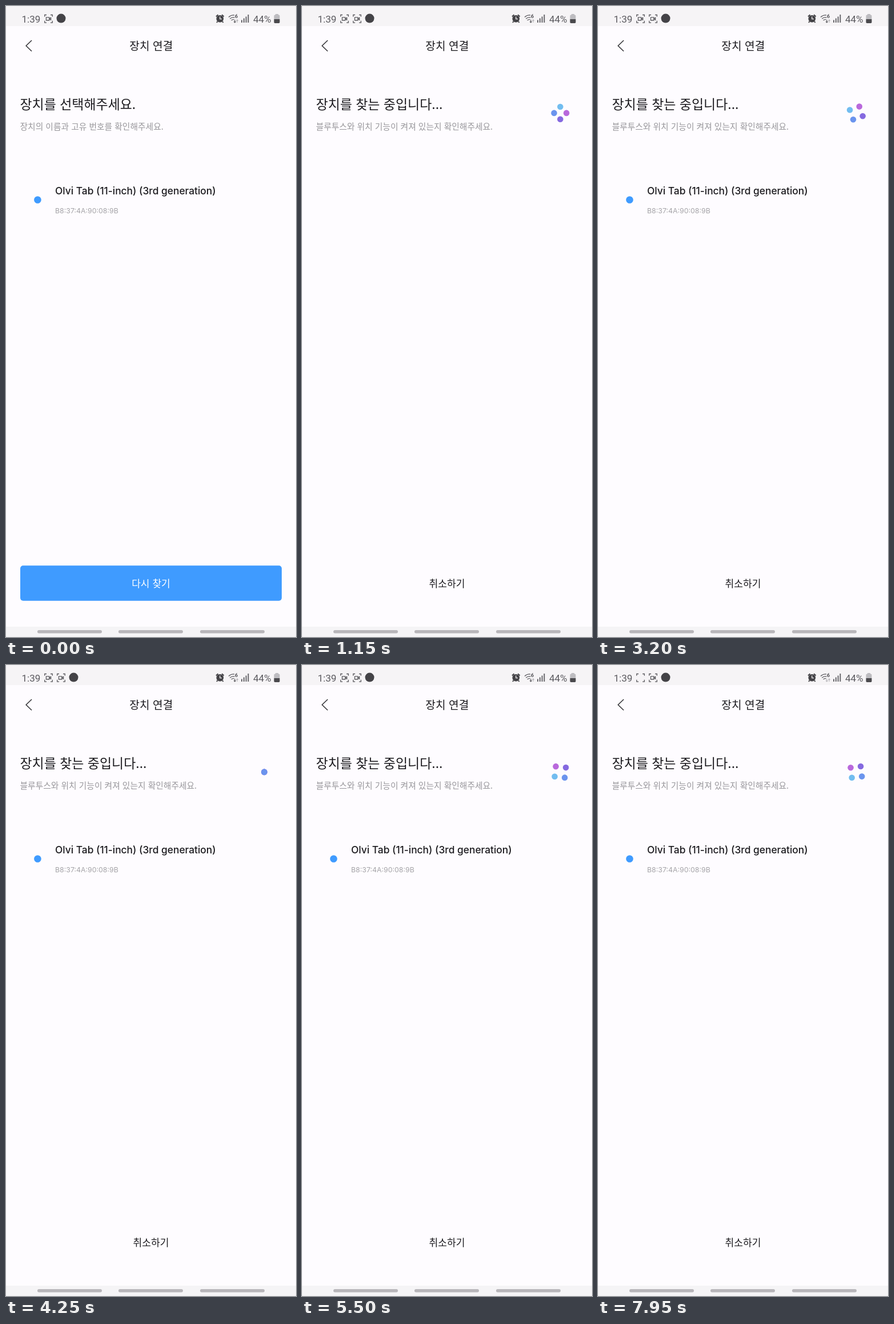
These frames come from a looping animation (508x1102 px, 8 s). An HTML page:

```html
<!DOCTYPE html>
<html lang="ko">
<head>
<meta charset="utf-8">
<title>장치 연결</title>
<style>
  html, body { margin: 0; width: 100%; height: 100%; overflow: hidden; background: #fefcff; }
  svg { display: block; width: 508px; height: 1102px; }
  text { font-family: "Noto Sans CJK KR", "Noto Sans CJK", sans-serif; fill: #1b1a1e; }
  .mid { text-anchor: middle; font-weight: 500; }
  .head { font-size: 22.95px; font-weight: 500; }
  .sub { font-size: 14.75px; fill: #98979b; }
  .btn { font-size: 17.1px; }
  .device { font: 500 17.35px Inter, sans-serif; }
  .address { font: 400 12.35px Inter, sans-serif; fill: #a5a4a8; }
  .status { font: 400 17px Roboto, sans-serif; fill: #5b5a5f; }
  .line { fill: none; stroke: #5b5a5f; stroke-width: 1.3; }
</style>
</head>
<body>
<svg viewBox="0 0 508 1102">
  <defs>
    <path id="corners" class="line" d="M4 .7H.7V4M11 .7H14.3V4M14.3 11V14.3H11M4 14.3H.7V11"/>
    <path id="camera" class="line" stroke-linejoin="round" d="M3.4 5H8.8V10.2H3.4ZM8.8 7.6L11.6 5.4V9.8Z"/>
  </defs>

  <rect width="508" height="1102" fill="#fefcff"/>
  <rect width="508" height="35" fill="#f6f4f6"/>
  <rect y="1084" width="508" height="18" fill="#f5f4f6"/>
  <g fill="#b8b6ba">
    <rect x="55" y="1090" width="113" height="5.4" rx="2.7"/>
    <rect x="197" y="1090" width="113" height="5.4" rx="2.7"/>
    <rect x="340" y="1090" width="113" height="5.4" rx="2.7"/>
  </g>

  <!-- Status bar -->
  <text class="status" x="27.5" y="28.7">1:39</text>
  <g transform="translate(67 14.8)">
    <use href="#corners"/>
    <use id="blink" href="#camera"/>
  </g>
  <g id="extra" transform="translate(89 14.8)">
    <use href="#corners"/>
    <use href="#camera"/>
  </g>
  <circle id="badge" cy="21.6" r="8" fill="#444347"/>

  <g fill="#444347">
    <circle cx="374.8" cy="22.3" r="6.3"/>
    <path d="M368 18.5L371.5 15.2M381.6 18.5L378.1 15.2M370.5 27L369 29M379 27L380.6 29" stroke="#444347" stroke-width="2"/>
    <path d="M374.8 18.5V22.6H378" fill="none" stroke="#f6f4f6" stroke-width="1.3"/>
  </g>
  <g class="line">
    <path d="M390 19.5Q394.5 15.5 400 16M392.3 22.3Q396 19 400.5 20.3M394.6 25Q397 23 399.5 23.8"/>
    <path d="M404.8 14.5Q402 15.5 402 18.7" stroke-width="1.2"/>
    <circle cx="403.6" cy="18.8" r="1.7" stroke-width="1.2"/>
    <path id="down" d="M400.8 24V29M399 27.2L400.8 29L402.6 27.2" stroke-width="1.2"/>
    <path d="M405 29V24M403.4 25.8L405 24L406.6 25.8" stroke="#b9b8bc" stroke-width="1.2"/>
    <path d="M413 29V24.5M416.8 29V21.5M420.6 29V18.5M424.4 29V15" stroke-width="1.8"/>
  </g>
  <text class="status" x="433" y="28.7">44%</text>
  <path d="M469.5 23V17.2Q469.5 15.6 471.2 15.6H472V14H477V15.6H477.8Q479.5 15.6 479.5 17.2V23Z" fill="#bdbcc0"/>
  <path d="M469.5 23H479.5V28.3Q479.5 30 477.8 30H471.2Q469.5 30 469.5 28.3Z" fill="#4a494d"/>

  <!-- App bar -->
  <path d="M45 60L35.2 69.5L45 79" fill="none" stroke="#38373b" stroke-width="1.6"/>
  <text class="mid" x="254.3" y="77" font-size="19.2">장치 연결</text>

  <g id="pick">
    <text class="head" x="24.5" y="179.6">장치를 선택해주세요.</text>
    <text class="sub" x="24.5" y="216.2">장치의 이름과 고유 번호를 확인해주세요.</text>
    <rect x="25" y="977.3" width="458" height="61.5" rx="5" fill="#3f9bff"/>
    <text class="mid btn" x="254" y="1015.2" style="fill:#fff">다시 찾기</text>
  </g>

  <g id="search">
    <text class="head" x="24.5" y="179.6">장치를 찾는 중입니다...</text>
    <text class="sub" x="24.5" y="216.2">블루투스와 위치 기능이 켜져 있는지 확인해주세요.</text>
    <text class="mid btn" x="254" y="1015.2">취소하기</text>
    <g id="spinner" transform="translate(452.4 186.9)"></g>
  </g>

  <g id="item">
    <circle cx="55.4" cy="338.5" r="6.3" fill="#3f9bff"/>
    <text class="device" x="86" y="328.7">Olvi Tab (11-inch) (3rd generation)</text>
    <text class="address" x="86" y="362">B8:37:4A:90:08:9B</text>
  </g>
</svg>
<script>
  const LOOP = 8000, SEARCH_AT = 50, FOUND_AT = 1400;
  const SPIN = 2485, SPIN_START = 1760, ORBIT = 12.5;
  const COLORS = ["#72bdf0", "#b968dc", "#8569e0", "#6b94ee"]; // top, right, bottom, left

  const $ = id => document.getElementById(id);
  const show = (id, on) => $(id).setAttribute("visibility", on ? "visible" : "hidden");
  const ease = (t, from, to) => {
    const u = Math.min(1, Math.max(0, (t - from) / (to - from)));
    return u * u * (3 - 2 * u);
  };

  const dots = COLORS.map(color => {
    const dot = document.createElementNS("http://www.w3.org/2000/svg", "circle");
    dot.setAttribute("r", 5.3);
    dot.setAttribute("fill", color);
    return $("spinner").appendChild(dot);
  });

  // Spread out, make one full turn, gather again, rest.
  function spin(t) {
    const p = (t - SPIN_START + SPIN) % SPIN;
    const radius = ORBIT * (ease(p, 0, 430) - ease(p, 1775, 2215));
    const turn = 2 * Math.PI * ease(p, 430, 1815);
    dots.forEach((dot, i) => {
      const a = turn + i * Math.PI / 2;
      dot.setAttribute("cx", radius * Math.sin(a));
      dot.setAttribute("cy", -radius * Math.cos(a));
    });
  }

  function draw(t) {
    const searching = t >= SEARCH_AT;
    const beat = t % 1000;
    show("pick", !searching);
    show("search", searching);
    show("extra", searching);
    show("item", !searching || t >= FOUND_AT);
    show("blink", beat < 530 || beat >= 980);
    $("badge").setAttribute("cx", searching ? 118.5 : 96.5);
    $("down").style.stroke = t < 6000 ? "#5b5a5f" : "#b9b8bc";
    spin(t);
  }

  const start = performance.now();
  function tick() {
    draw((performance.now() - start) % LOOP);
    requestAnimationFrame(tick);
  }
  tick();
</script>
</body>
</html>
```
